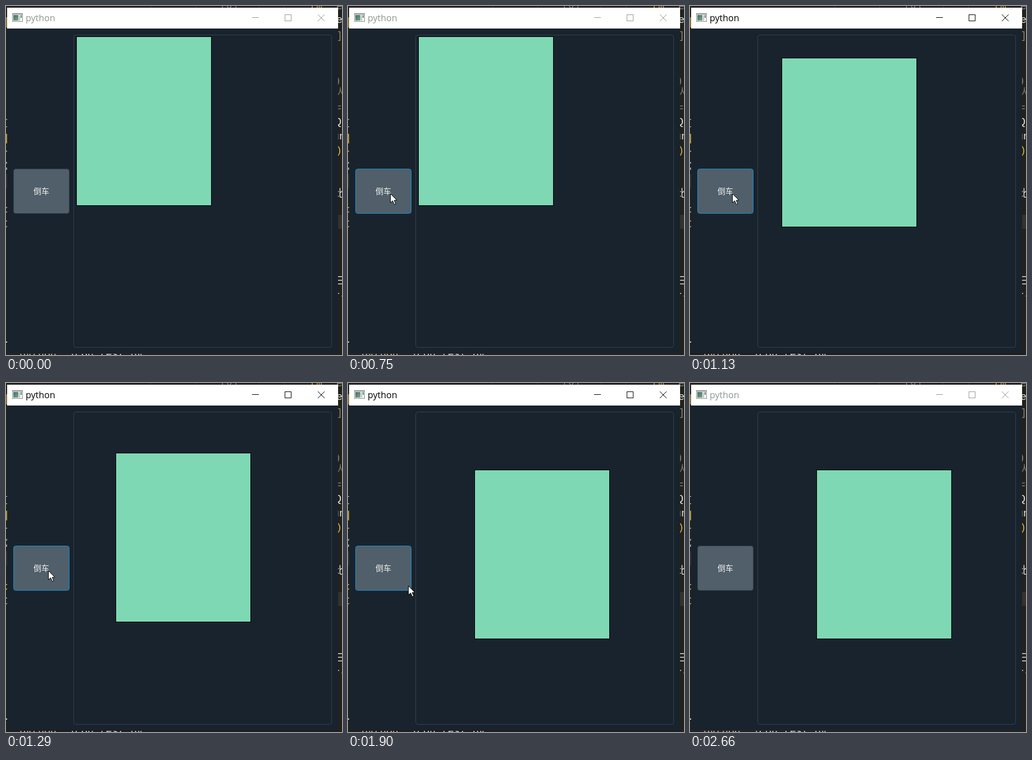
Recreate the animation shown at these times as an HTML page with a canvas. Size 598x620 px, loop 2750 ms.

```html
<!DOCTYPE html>
<html lang="zh">
<head>
<meta charset="utf-8">
<style>
html, body { margin: 0; width: 100%; height: 100%; overflow: hidden; background: #23211c; }
canvas { display: block; }
</style>
</head>
<body>
<canvas id="stage" width="598" height="620"></canvas>
<script>
const g = document.getElementById('stage').getContext('2d');
const LOOP = 2750;
const MONO = '18.3px "Liberation Mono", monospace';
const SLIDE = [0, 9, 23, 38, 54, 70, 86, 100];

function box(color, x, y, w, h) {
  g.fillStyle = color;
  g.fillRect(x, y, w, h);
}

function text(str, x, y, color, font) {
  g.font = font;
  g.fillStyle = color;
  g.fillText(str, x, y);
}

function round(x, y, w, h, r, stroke, fill) {
  g.beginPath();
  g.roundRect(x + .5, y + .5, w - 1, h - 1, r);
  if (fill) {
    g.fillStyle = fill;
    g.fill();
  }
  g.strokeStyle = stroke;
  g.stroke();
}

// Code editor that shows around the edges of the window
function drawEditor() {
  box('#23211c', 0, 0, 598, 620);
  box('#36312b', 591, 371, 7, 25);
  box('#36312b', 0, 299, 2, 25);
  for (const x of [257, 337, 450, 495]) box('#3a3832', x, 0, 1, 3);
  text('(文)', 383, 8, '#8a887e', '17px "Noto Sans CJK SC", sans-serif');
  text('(m', 541, 7, '#c98a3c', MONO);
  const lines = [
    ['e', 588, 6, '#8a887e'], ['e', 588, 30, '#e8e8e2'], [']', 588, 58, '#8a887e'],
    [')', 585, 138, '#8a887e'], ['人', 586, 160, '#77756b'], ['=', 586, 186, '#8a887e'],
    ['Q', 586, 211, '#e8e8e2'], ['un', 582, 237, '#e8e8e2'], [')', 587, 262, '#d9b84a'],
    ['比', 584, 339, '#e8e8e2'], ['三', 585, 494, '#e8e8e2'], ['-/', 585, 516, '#e8e8e2']
  ];
  for (const [s, x, y, c] of lines) text(s, x, y, c, MONO.replace(',', ', "Noto Sans CJK SC",'));
  const slivers = [
    [20, 18, '#8d7530'], [201, 1, '#ddd'], [214, 1, '#ddd'], [227, 17, '#b59530'],
    [257, 2, '#b59530'], [277, 3, '#7f97a3'], [287, 4, '#7f97a3'], [357, 2, '#b59530'],
    [365, 2, '#b59530'], [381, 2, '#a08a4a'], [391, 2, '#a08a4a'], [596, 2, '#ddd']
  ];
  for (const [y, h, c] of slivers) box(c, 0, y, 2, h);
  text('python', 24, 624, '#d8cf9a', MONO);
  text('.\\con_test.py', 101, 624, '#e0e0da', MONO);
}

function drawTitle(active) {
  const ink = active ? '#000' : '#999';
  box('#fff', 2, 3, 589, 37);
  box('#8b8f8d', 11, 13, 19, 15);
  box('#f4f6f5', 12, 15, 17, 12);
  const fade = g.createLinearGradient(13, 16, 22, 26);
  fade.addColorStop(0, '#3f6f68');
  fade.addColorStop(1, '#7fa58c');
  box(fade, 13, 16, 9, 10);
  box('#b9c2be', 23, 16, 2, 10);
  box('#5d7f78', 26, 16, 2, 5);
  text('python', 35, 27, active ? '#000' : '#8f9693', '16px "Open Sans", "Noto Sans", sans-serif');
  box(ink, 438, 20, 12, 1);
  g.strokeStyle = ink;
  g.strokeRect(496.5, 15.5, 11, 11);
  g.beginPath();
  g.moveTo(555, 15);
  g.lineTo(567, 27);
  g.moveTo(567, 15);
  g.lineTo(555, 27);
  g.stroke();
}

function drawPointer([x, y]) {
  g.save();
  g.translate(x + .5, y + .5);
  g.beginPath();
  for (const [a, b] of [[0, 0], [0, 16], [4, 12.5], [7, 19], [9.5, 18], [6.7, 11.7], [11.5, 11.5]]) g.lineTo(a, b);
  g.closePath();
  g.fillStyle = '#fff';
  g.fill();
  g.strokeStyle = '#000';
  g.stroke();
  g.restore();
}

// The screen refreshes in ticks of 230/3 ms
function pointerAt(tick) {
  if (tick < 0 || tick > 29) return null;
  if (tick < 23) {
    const left = (1 - Math.min(tick / 8, 1)) ** 2.7;
    return [Math.round(75 + 309 * left), Math.round(333 + 248 * left)];
  }
  const n = tick - 23;
  return [Math.round(107 + 36.5 * n + 5.5 * n * n), Math.round(360 + 29.2 * n + 2.24 * n * n)];
}

function draw(t) {
  const tick = Math.floor((t - 130) * 3 / 230 + 1e-6);
  const active = tick >= 10 && tick < 33;
  const pointer = pointerAt(tick);
  const hover = pointer && pointer[0] < 113 && pointer[1] < 369;
  const shift = SLIDE[Math.max(0, Math.min(tick - 10, 7))];

  g.lineWidth = 1;
  drawEditor();
  box('#19232d', 2, 40, 589, 577);
  box(active ? '#1c1620' : '#2b2730', 2, 617, 589, 1);
  drawTitle(active);

  round(13, 289, 100, 80, 4, hover ? '#148cd2' : '#32414b', '#505f69');
  g.textAlign = 'center';
  text('倒车', 63, 334, '#f0f0f0', '14px "Noto Sans CJK SC", "Noto Sans CJK", sans-serif');
  g.textAlign = 'left';

  round(120, 51, 460, 556, 4, '#32414b');
  box('#7fd8b4', 125 + shift, 54 + shift, 241, 301);
  g.strokeStyle = '#000';
  g.strokeRect(125.5 + shift, 54.5 + shift, 240, 300);

  if (pointer) drawPointer(pointer);
}

const start = performance.now();
function loop() {
  draw((performance.now() - start) % LOOP);
  requestAnimationFrame(loop);
}
loop();
</script>
</body>
</html>
```
